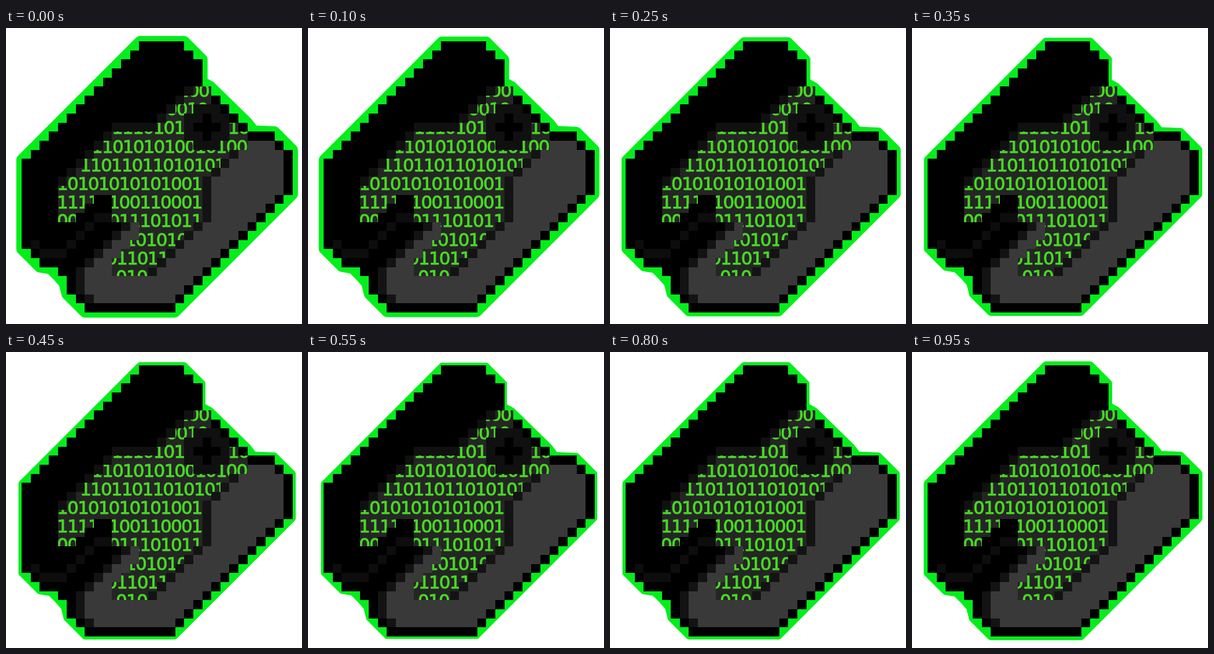
These frames come from a looping animation (512x512 px, 1 s). An HTML page with a canvas:

```html
<!DOCTYPE html>
<html>
<head>
<meta charset="utf-8">
<style>
html, body { margin: 0; height: 100%; overflow: hidden; background: #fff; }
canvas { display: block; }
</style>
</head>
<body>
<canvas id="stage" width="512" height="512"></canvas>
<script>
const ctx = document.getElementById('stage').getContext('2d');
const CELL = 15.625, PITCH = 17.9;
const X = i => Math.round(27 + CELL * i);
const Y = j => Math.round(23 + CELL * j);

// Fill columns a..b of row j (and optionally the rows down to k)
function span(j, a, b, color, k = j + 1) {
  ctx.fillStyle = color;
  ctx.fillRect(X(a), Y(j), X(b) - X(a), Y(k) - Y(j));
}

// Edges of the silhouette and of the digit area, in cells per row
const bodyLeft = j => j <= 13 ? 13 - j : j < 23 ? 0 : [1, 2, 4, 5, 5, 6, 7][j - 23];
const bodyRight = j => j < 3 ? 18 + j : j < 5 ? 20 : j < 10 ? 16 + j
  : j < 13 ? 18 + j : j < 17 ? 30 : 46 - j;
const codeLeft = j => j < 10 ? 24 - j : j < 16 ? 20 - j : j < 20 ? 4
  : [13, 13, 12, 11, 10, 10][j - 20];
const codeRight = j => j < 7 ? 21 : j < 11 ? 19 : j === 11 ? 25
  : j < 15 ? 35 - j : j < 20 ? 20 : 39 - j;

// Corners of the glowing border, in cells
const hull = [[13.1, 0], [18, 0], [20, 2], [20, 4.5], [20.9, 5], [25, 9], [25.7, 9.9], [28, 10],
  [30, 12], [30, 16.95], [16.95, 30], [7, 30], [5, 28], [4.7, 26.8], [4, 26], [3.2, 25.2],
  [2, 25], [0, 23], [0, 13.1]];

// Digit lines: text and left edge
const lines = [['100', 298], ['0010', 278], ['1110101', 184], ['110101010010100', 149],
  ['110110110101011', 129], ['101010101010011', 89], ['11111100110001', 89],
  ['00111011101011', 89], ['101010', 207], ['011011', 174], ['010', 191]];

function digits(text, x, y) {
  [...text].forEach((d, k) => {
    const cx = x + PITCH * (k + 0.5);
    ctx.fillText(d, cx, y);
    ctx.strokeText(d, cx, y);
  });
}

function drawCode() {
  const areas = [];
  for (let j = 5; j < 26; j++) areas.push([j, codeLeft(j), codeRight(j)]);
  areas.push([9, 23, 24], [10, 23, 25]);
  ctx.save();
  ctx.beginPath();
  for (const [j, a, b] of areas) ctx.rect(X(a), Y(j), X(b) - X(a), Y(j + 1) - Y(j));
  ctx.clip();
  ctx.fillStyle = '#252525';
  ctx.fillRect(0, 0, 512, 512);
  ctx.font = '31px "DejaVu Sans", sans-serif';
  ctx.textAlign = 'center';
  ctx.fillStyle = ctx.strokeStyle = '#47da22';
  ctx.lineWidth = 1;
  lines.forEach(([text, x], n) => digits(text, x, 119 + 32.2 * n));
  digits('10', 385, 183.4);
  ctx.restore();
}

function drawBody() {
  for (let j = 0; j < 30; j++) span(j, bodyLeft(j), bodyRight(j), '#000');

  // Grey side and lower part
  for (let j = 11; j < 29; j++) {
    const from = j === 11 ? 25 : j < 20 ? codeRight(j) + 1 : j === 28 ? 8 : Math.max(7, 32 - j);
    span(j, from, bodyRight(j) - 1, '#393939');
  }
  drawCode();

  // Shaded cells around the digit area
  for (let j = 5; j < 16; j++) span(j, j === 9 ? 10 : codeLeft(j) - 1, codeLeft(j), '#101010');
  for (let j = 12; j < 26; j++) span(j, codeRight(j), codeRight(j) + 1, '#131313');
  for (let j = 20; j < 29; j++) {
    const a = j === 28 ? 7 : Math.max(6, 31 - j);
    span(j, a, a + 1, '#131313');
  }

  // Mouth
  span(17, 8, 10, '#000', 20);
  span(18, 7, 8, '#000');
  span(19, 6, 10, '#000');
  span(19, 8, 10, '#0d0d0d');
  for (let j = 20; j < 23; j++) span(j, 27 - j, 28 - j, '#0d0d0d');
  span(22, 1, 2, '#0d0d0d');
  span(23, 2, 5, '#0d0d0d');

  // Eye
  span(7, 19, 22, '#101010', 12);
  span(8, 18, 23, '#101010', 11);
  span(8, 20, 21, '#000', 11);
  span(9, 19, 22, '#000');
}

// Border width steps down, rests, then swells again
function glow(ms) {
  const step = Math.floor(ms / 50);
  return 9.2 - 0.42 * (Math.min(step, 11) - Math.max(0, step - 14));
}

function frame() {
  ctx.fillStyle = '#fff';
  ctx.fillRect(0, 0, 512, 512);
  ctx.beginPath();
  for (const [i, j] of hull) ctx.lineTo(27 + CELL * i, 23 + CELL * j);
  ctx.closePath();
  ctx.fillStyle = ctx.strokeStyle = '#02ee1a';
  ctx.lineJoin = 'round';
  ctx.lineWidth = 2 * glow(performance.now() % 1000);
  ctx.fill();
  ctx.stroke();
  drawBody();
  requestAnimationFrame(frame);
}
frame();
</script>
</body>
</html>
```
